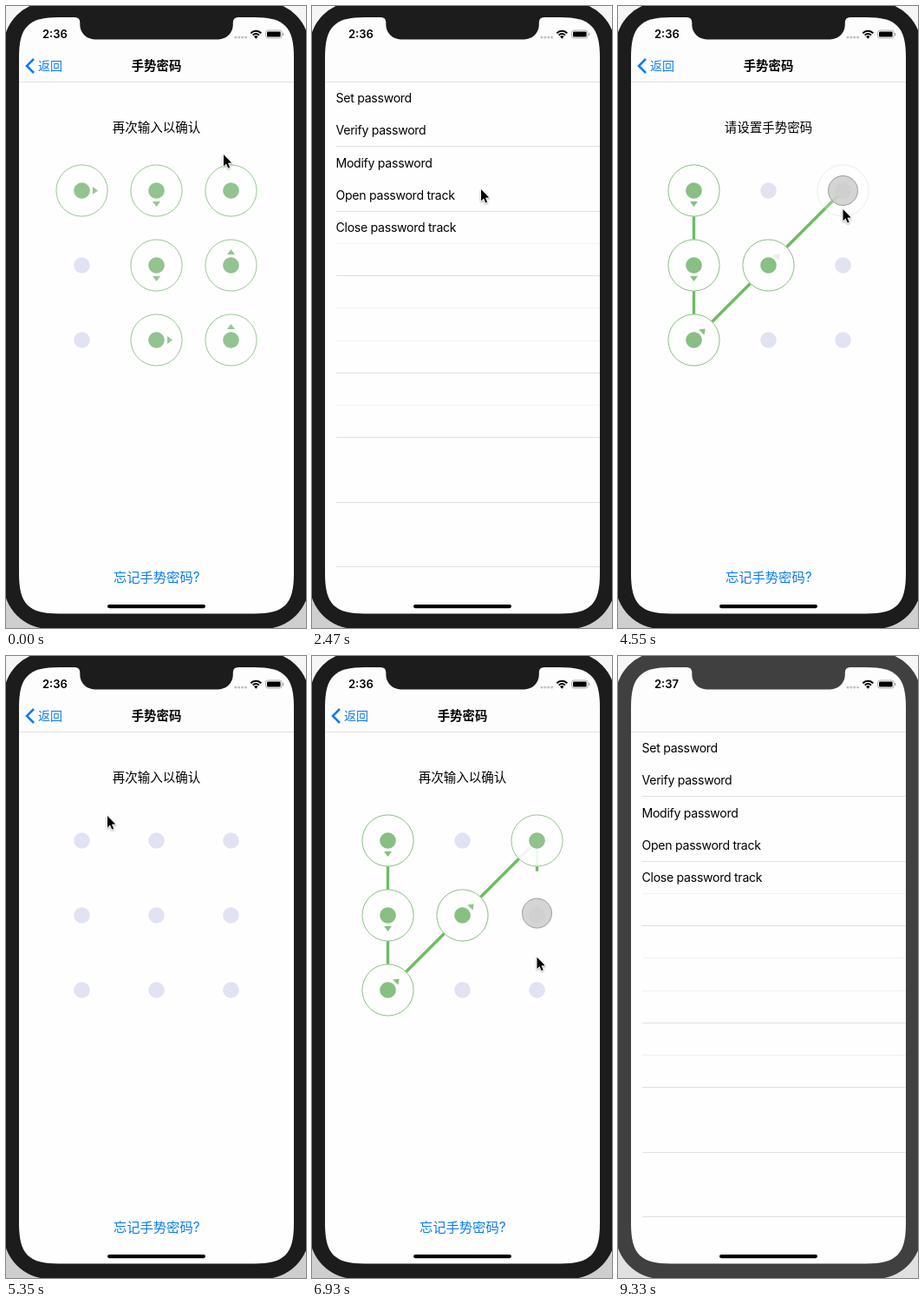
Animation of 346x716 px, one loop 9.43 s. Source, as an HTML page with a canvas:

```html
<!DOCTYPE html>
<html lang="zh-CN">
<head>
<meta charset="utf-8">
<title>手势密码</title>
<style>
html, body { margin: 0; width: 100%; height: 100%; overflow: hidden; background: #fff; }
canvas { display: block; width: 346px; height: 716px; }
</style>
</head>
<body>
<canvas id="stage"></canvas>
<script>
const W = 346, H = 716, LOOP = 9430;
const SCREEN = { x: 15, y: 13, w: 317, h: 686.5 };
const NAV = 87, BLUE = '#0a7bf7', PAPER = '#fefefe', GREEN = '#88bf82';
const FONT = 'Inter, "Noto Sans CJK SC", "Noto Sans CJK", sans-serif';
const TOUCH_LAG = 70, FADE_IN = 250, FADE_OUT = 360, SLIDE = 480;

const canvas = document.getElementById('stage');
const ctx = canvas.getContext('2d');
const dpr = window.devicePixelRatio || 1;
canvas.width = W * dpr;
canvas.height = H * dpr;

const clamp = v => Math.max(0, Math.min(1, v));
const smooth = v => { v = clamp(v); return v * v * (3 - 2 * v); };
const point = (x, y) => ({ x, y });
const dist = (a, b) => Math.hypot(a.x - b.x, a.y - b.y);
const mix = (a, b, u) => point(a.x + (b.x - a.x) * u, a.y + (b.y - a.y) * u);

// Cells are numbered 0-8, row by row
const cell = i => point(87.5 + 86 * (i % 3), 212.5 + 86 * Math.floor(i / 3));
const HOOK = [0, 1, 4, 7, 8, 5, 2], ZED = [0, 3, 6, 4, 2, 5, 8];
const corners = ids => ids.filter((id, n) => 2 * id !== ids[n - 1] + ids[n + 1]).map(cell);

// start/end: pointer motion; up: release; lag: delay of the drawn line
const strokes = [
  { start: -2000, end: -900, up: -45, cells: HOOK, lag: 0 },
  { start: 660, end: 1740, up: 1920, cells: HOOK, lag: 10 },
  { start: 3719, end: 4797, up: 4875, cells: ZED, lag: 20 },
  { start: 5874, end: 7034, up: 7910, cells: ZED, lag: 68 }
];
const glide = (start, end, to) => ({ start, end, pts: [to] });
const legs = [
  ...strokes.map(s => ({ start: s.start, end: s.end, pts: corners(s.cells) })),
  glide(-1, 0, point(251, 171)),
  glide(60, 490, cell(0)),
  glide(2200, 2470, point(195, 211)),
  glide(2470, 2720, point(119, 103)),
  glide(3430, 3700, cell(0)),
  glide(4890, 5350, point(117, 184)),
  glide(5400, 5800, cell(0)),
  glide(7960, 8760, point(250, 722))
].sort((a, b) => a.start - b.start);
legs.forEach((leg, i) => {
  if (i) leg.pts = [legs[i - 1].pts.at(-1), ...leg.pts];
});

// Every straight part eases in and out and takes time by its length
function pointer(t) {
  const { start, end, pts } = legs.findLast(k => t >= k.start) || legs[0];
  const total = pts.reduce((sum, p, i) => sum + (i ? dist(p, pts[i - 1]) : 0), 0);
  let left = clamp((t - start) / (end - start)) * total;
  for (let i = 1; i < pts.length; i++) {
    const len = dist(pts[i - 1], pts[i]);
    if (left < len) return mix(pts[i - 1], pts[i], smooth(left / len));
    left -= len;
  }
  return pts.at(-1);
}

const touchAt = t => pointer(t - TOUCH_LAG);

// Time at which the line first enters each cell
for (const s of strokes) {
  let t = s.start;
  s.hits = s.cells.map(id => {
    while (t < s.up && dist(touchAt(t - s.lag), cell(id)) > 30) t += 2;
    return t;
  });
}

// Page slides: 0 = menu, 1 = gesture page
const slides = [[1960, 1, 0], [3000, 0, 1], [7930, 1, 0]];
function pagePos(t) {
  const slide = slides.findLast(s => t >= s[0]);
  if (!slide) return 1;
  const [start, from, to] = slide;
  return from + (to - from) * (1 - Math.pow(1 - clamp((t - start) / SLIDE), 4));
}

function fill(color) {
  ctx.fillStyle = color;
  ctx.fill();
}

function stroke(color, width) {
  ctx.strokeStyle = color;
  ctx.lineWidth = width;
  ctx.stroke();
}

function disc(x, y, r) {
  ctx.beginPath();
  ctx.arc(x, y, r, 0, Math.PI * 2);
}

function box(x, y, w, h, r, color) {
  ctx.beginPath();
  ctx.roundRect(x, y, w, h, r);
  fill(color);
}

function trace(pts) {
  ctx.beginPath();
  pts.forEach(p => ctx.lineTo(p[0], p[1]));
}

function text(str, x, y, size, weight = 400, color = '#000', align = 'left', track = 0) {
  ctx.font = `${weight} ${size}px ${FONT}`;
  ctx.letterSpacing = track + 'px';
  ctx.textAlign = align;
  ctx.fillStyle = color;
  ctx.fillText(str, x, y);
}

function layer(dx, alpha, draw) {
  ctx.save();
  ctx.translate(dx, 0);
  ctx.globalAlpha *= alpha;
  draw();
  ctx.restore();
}

// Rectangle with continuous corners
function screenPath() {
  const { x, y, w, h } = SCREEN, e = 46, c = 11;
  ctx.beginPath();
  for (const [cx, cy, sx, sy] of [[x, y, 1, 1], [x + w, y, -1, 1], [x + w, y + h, -1, -1], [x, y + h, 1, -1]]) {
    const side = [cx, cy + sy * e, cx, cy + sy * c], flat = [cx + sx * e, cy, cx + sx * c, cy];
    const [a, b] = sx === sy ? [side, flat] : [flat, side];
    ctx.lineTo(a[0], a[1]);
    ctx.bezierCurveTo(a[2], a[3], b[2], b[3], b[0], b[1]);
  }
  ctx.closePath();
}

function drawMenu(t) {
  box(SCREEN.x, NAV, SCREEN.w, SCREEN.h, 0, PAPER);
  const glow = t >= 2950 ? 1 - clamp((t - 3050) / 400) : 0;
  layer(0, glow, () => box(15, NAV, 317, 37, 0, '#d9d9d9'));
  ['Set password', 'Verify password', 'Modify password', 'Open password track', 'Close password track']
    .forEach((s, i) => text(s, 27.5, 111 + i * 37.3, 14.1, 400, '#000', 'left', -0.28));
  for (let n = 1; n < 17; n++) {
    const strong = n % 2 === (n < 8 ? 0 : 1), faint = n > 4 && n < 12;
    if (strong || faint) box(28, Math.floor(87.2 + n * 37.23), 304, 1, 0, strong ? '#e0e0e0' : '#f1f1f1');
  }
}

function drawArrow(from, to) {
  ctx.save();
  ctx.translate(from.x, from.y);
  ctx.rotate(Math.atan2(to.y - from.y, to.x - from.x));
  trace([[12.5, -4.5], [18.5, 0], [12.5, 4.5]]);
  fill(GREEN);
  ctx.restore();
}

function drawPattern(t) {
  const s = strokes.find(k => t >= k.start + TOUCH_LAG / 5 && t < k.up + FADE_OUT);
  const level = n => s && t >= s.hits[n]
    ? smooth((t - s.hits[n]) / FADE_IN) * (1 - clamp((t - s.up) / FADE_OUT)) : 0;

  if (s && t < s.up) {
    const line = s.cells.filter((id, n) => t >= s.hits[n]).map(cell);
    line.push(touchAt(t - s.lag));
    trace(line.map(p => [p.x, p.y]));
    ctx.lineJoin = 'round';
    stroke('#6cbb62', 3.3);
  }
  for (let id = 0; id < 9; id++) {
    const c = cell(id), n = s ? s.cells.indexOf(id) : -1, a = level(n);
    layer(0, a, () => { disc(c.x, c.y, 29.7); fill(PAPER); });
    disc(c.x, c.y, 9.3);
    fill('#e1e2f2');
    layer(0, a, () => {
      fill(GREEN);
      disc(c.x, c.y, 29.6);
      stroke(GREEN, 1);
    });
    if (a) layer(0, level(n + 1), () => drawArrow(c, cell(s.cells[n + 1])));
  }
}

function drawGesture(t) {
  box(SCREEN.x, NAV, SCREEN.w, SCREEN.h, 0, PAPER);
  const hint = t >= 2950 && t < 4880 ? '请设置手势密码' : '再次输入以确认';
  text(hint, 173.5, 145.3, 14.5, 400, '#000', 'center');
  drawPattern(t);
  text('忘记手势密码?', 173.7, 663, 15.3, 400, BLUE, 'center');
}

function drawNav(pos) {
  box(SCREEN.x, SCREEN.y, SCREEN.w, NAV - SCREEN.y, 0, '#fdfdfd');
  box(SCREEN.x, NAV, SCREEN.w, 1, 0, '#e0e0e0');
  layer(0, pos, () => {
    text('手势密码', 173.5 + (1 - pos) * 130, 74, 14.4, 700, '#000', 'center');
    trace([[32, 61], [24, 69], [32, 77]]);
    ctx.lineJoin = 'miter';
    stroke(BLUE, 2.5);
    text('返回', 37 + (1 - pos) * 50, 74, 14, 400, BLUE);
  });
}

function drawStatus(t) {
  text(t < 7000 ? '2:36' : '2:37', 42, 37, 13, 600);
  for (let i = 0; i < 4; i++) box(263.5 + i * 3.9, 34.8, 2.8, 2.6, 0.8, '#c2c2c2');
  for (const r of [5, 8.2]) {
    ctx.beginPath();
    ctx.arc(288.3, 37, r, -Math.PI * 0.76, -Math.PI * 0.24);
    stroke('#000', 2);
  }
  trace([[288.3, 37.8], [286, 35], [288.3, 34], [290.6, 35]]);
  fill('#000');
  ctx.beginPath();
  ctx.roundRect(299.5, 28, 18.6, 9, 2.5);
  stroke('#a5a5a5', 0.9);
  box(301, 29.5, 15.6, 6, 1.3, '#000');
  box(319, 31, 1.3, 3, 0.6, '#a5a5a5');
}

function drawNotch(color) {
  const l = 85.3, r = 261.8, top = SCREEN.y, bottom = 38.4;
  ctx.beginPath();
  ctx.moveTo(l - 6, top - 1);
  ctx.lineTo(l - 6, top);
  ctx.quadraticCurveTo(l, top, l, top + 6);
  ctx.arcTo(l, bottom, l + 18, bottom, 17);
  ctx.arcTo(r, bottom, r, top + 6, 17);
  ctx.lineTo(r, top + 6);
  ctx.quadraticCurveTo(r, top, r + 6, top);
  ctx.lineTo(r + 6, top - 1);
  fill(color);
}

function drawTouch(t) {
  const held = strokes.some(s => t >= s.start && t < s.up);
  const tap = t >= 2950 && t < 3050;
  if (!held && !tap) return;
  const p = touchAt(t);
  disc(p.x, p.y, 17);
  fill('rgba(206,206,206,0.88)');
  stroke('#9c9c9c', 1);
}

function drawCursor(t) {
  const p = pointer(t);
  ctx.save();
  ctx.translate(p.x, p.y);
  trace([[0, 0], [0, 13.4], [3, 10.5], [5.2, 15.6], [7.2, 14.7], [5, 9.8], [9.2, 9.6]]);
  ctx.closePath();
  ctx.shadowColor = 'rgba(0,0,0,0.35)';
  ctx.shadowBlur = 2 * dpr;
  ctx.shadowOffsetY = dpr;
  ctx.lineJoin = 'round';
  stroke('#fff', 1.8);
  ctx.shadowColor = 'transparent';
  fill('#000');
  ctx.restore();
}

function drawPages(t, pos) {
  if (pos < 1) {
    layer(-pos * SCREEN.w * 0.3, 1, () => drawMenu(t));
    box(SCREEN.x, NAV, SCREEN.w, SCREEN.h, 0, `rgba(0,0,0,${0.1 * pos})`);
  }
  if (pos > 0) layer((1 - pos) * SCREEN.w, 1, () => drawGesture(t));
}

function render(t) {
  const inactive = t >= 9330, bezel = inactive ? '#404040' : '#1c1c1c';
  const pos = pagePos(t);
  ctx.setTransform(dpr, 0, 0, dpr, 0, 0);
  const back = ctx.createLinearGradient(0, 0, 0, H);
  back.addColorStop(0, '#f6f6f6');
  back.addColorStop(1, inactive ? '#e0e0e0' : '#cecece');
  ctx.fillStyle = back;
  ctx.fillRect(0, 0, W, H);
  box(-3, -5, 353, 722, 53, bezel);

  ctx.save();
  screenPath();
  ctx.clip();
  drawPages(t, pos);
  drawNav(pos);
  drawStatus(t);
  box(117, 689, 113, 4.2, 2.1, '#000');
  drawTouch(t);
  ctx.restore();

  drawNotch(bezel);
  drawCursor(t);
}

const begin = performance.now();
function tick() {
  render((performance.now() - begin) % LOOP);
  requestAnimationFrame(tick);
}
tick();
</script>
</body>
</html>
```
